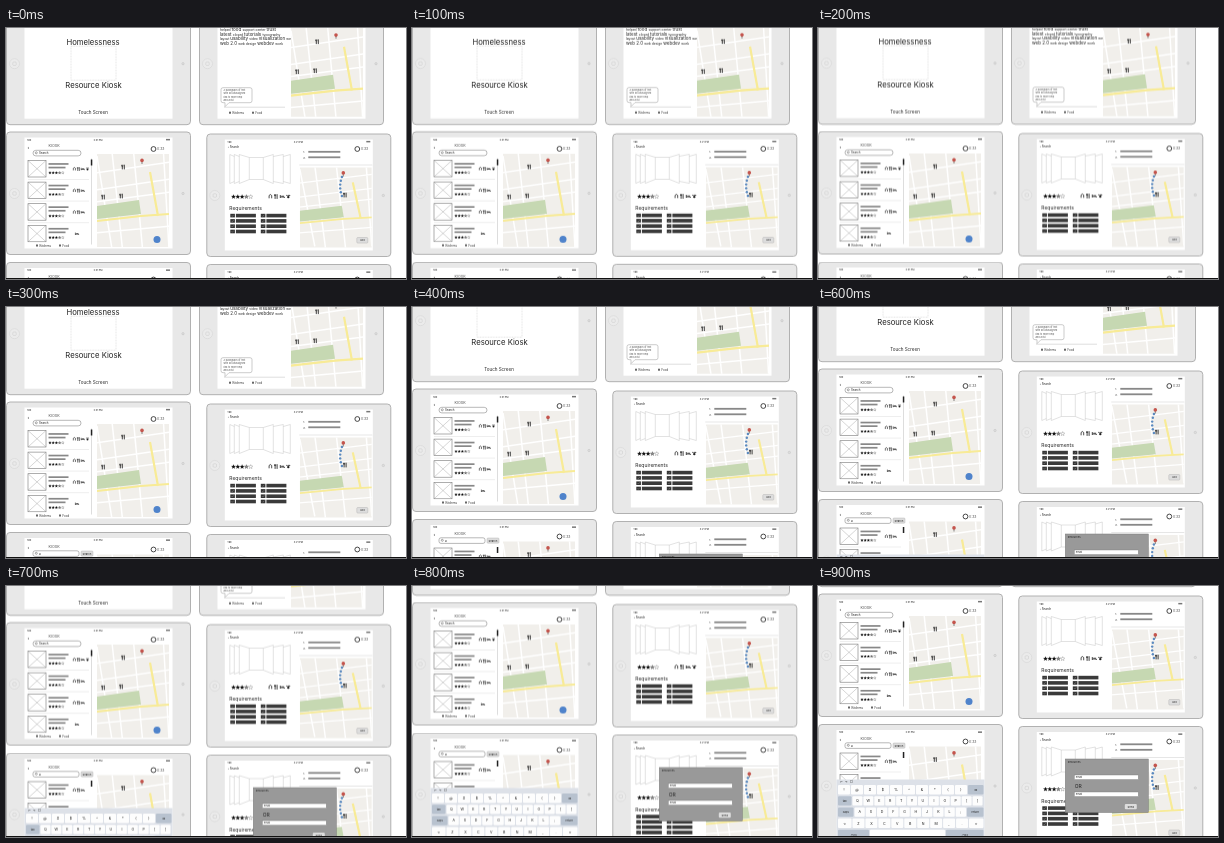
Recreate the animation shown at these times as an HTML page. Size 400 by 251 pixels, loop 1 s.

```html
<!DOCTYPE html>
<html lang="en">
<head>
<meta charset="utf-8">
<title>Kiosk wireframes</title>
<style>
  html, body { margin: 0; width: 100%; height: 100%; overflow: hidden; background: #fff; }
  #stage { display: block; width: 400px; height: 251px; }
  text { font-family: Inter, "Open Sans", sans-serif; fill: #222; }
</style>
</head>
<body>
<svg id="stage" viewBox="0 0 400 251">
  <g id="board"></g>
  <rect y="250" width="400" height="1" fill="#111"/>
</svg>
<script>
const range = (n, fn) => Array.from({ length: n }, (_, i) => fn(i)).join('');
const rect = (x, y, w, h, fill = 'none', more = '') =>
  `<rect x="${x}" y="${y}" width="${w}" height="${h}" fill="${fill}" ${more}/>`;
const path = (d, stroke, w = 0.5, fill = 'none') =>
  `<path d="${d}" stroke="${stroke}" stroke-width="${w}" fill="${fill}"/>`;
const circle = (x, y, r, fill, more = '') =>
  `<circle cx="${x}" cy="${y}" r="${r}" fill="${fill}" ${more}/>`;
const text = (x, y, size, str, more = '') =>
  `<text x="${x}" y="${y}" font-size="${size}" ${more}>${str}</text>`;
const group = (x, y, body, scale = 1) =>
  `<g transform="translate(${x} ${y}) scale(${scale})">${body}</g>`;
const line = (color, w = 0.5) => `stroke="${color}" stroke-width="${w}"`;
const mid = 'text-anchor="middle"';

// Icons, centred on x, y
const fork = (x, y, k) => group(x, y,
  path('M-1.2-2.2V-.6M-.2-2.2V-.6M-.7-1V2.4M1.3-2.3V2.4', '#111', 0.8), k);
const bed = (x, y, k) => group(x, y, path('M-2-1.5V1.5M-2 .5H2V1.5M-1-.3H1.8', '#222', 0.8), k);
const cup = (x, y, k) => group(x, y, path('M-1.2 1.8V-1L0-2 1.4-1V1.8', '#222', 0.8), k);
const paw = (x, y, k) => group(x, y, circle(0, 0.6, 1.2, '#222') +
  range(3, i => circle(-1.4 + i * 1.4, -1.2, 0.6, '#222')), k);
const star = (x, y, r, fill = '#111') => {
  const pts = Array.from({ length: 10 }, (_, i) => {
    const a = i * Math.PI / 5, k = i % 2 ? r * 0.45 : r;
    return (x + k * Math.sin(a)).toFixed(2) + ',' + (y - k * Math.cos(a)).toFixed(2);
  });
  return `<polygon points="${pts.join(' ')}" fill="${fill}" ${line('#111', 0.2)}/>`;
};
const stars = (x, y, r, step) => range(5, i => star(x + i * step, y, r, ['#111', '#888', '#fff'][Math.max(0, i - 2)]));
const clock = (x, y) =>
  circle(x, y, 2.4, '#fff', line('#333', 0.9)) + text(x + 3.6, y + 1.3, 3.4, '0:33', 'opacity=".8"');
const pin = (x, y) => path(`M${x} ${y + 3}V${y}`, '#555', 0.7) + circle(x, y - 0.6, 1.8, '#c4544c');

function map(x, y, w, h, top = 0, viewH = h, forks = true) {
  const streets = 'M-2 19L74 8M-2 36L74 25M-2 48L74 38M-2 79L74 72M12-30L26 100M34-30L46 100' +
    'M0 2L15 95M66-10L72 95';
  return `<svg x="${x}" y="${y}" width="${w}" height="${h}" viewBox="0 ${top} 72 ${viewH}" preserveAspectRatio="none">` +
    rect(0, -30, 72, 150, '#f1efeb') +
    path(streets, '#fff', 1.5) +
    path('M0 52L42 46 44 60 0 65Z', 'none', 0, '#c6d8b2') +
    path('M53 18L61 62M0 67L44 62 72 60', '#f8eb96', 2.2) +
    (forks ? fork(26, 13) + fork(6, 43) + fork(24, 42) + pin(45, 7) : '') + '</svg>';
}

// Tablet body with a 148 x 111 screen starting at 18.5, 6
const tablet = (x, y, body) => group(x, y,
  rect(0.5, 0.5, 184, 122.5, '#e8e8e8', 'rx="3.5" ' + line('#aaa', 0.9)) +
  circle(8.5, 62, 5, '#ebebeb', line('#d8d8d8', 0.7)) +
  rect(6.8, 60.3, 3.4, 3.4, 'none', 'rx=".8" ' + line('#c8c8c8')) +
  circle(177, 62, 1.2, '#ddd', line('#bbb', 0.4)) +
  rect(18.5, 6, 148, 111, '#fff') +
  text(21, 9.2, 2.4, 'Tab') + text(92, 9.2, 2.4, '4:21 PM', mid) +
  rect(160, 7.4, 4, 1.5, '#777') + body);

const tabs = y => rect(30, y - 2, 2, 2, '#666') + text(33.5, y, 2.8, 'Kitchens') +
  rect(53, y - 2, 2, 2, '#666') + text(56.5, y, 2.8, 'Food');

const welcome =
  rect(65, 44.5, 45, 34, '#fff', line('#ccc') + ' stroke-dasharray="1 .6"') +
  text(87, 43, 7.7, 'Homelessness', mid) +
  text(87.5, 86, 7.7, 'Resource Kiosk', mid) +
  text(87, 112, 4.55, 'Touch Screen', mid);

const cloud = [
  ['helped', 'food', 'support center', 'trust'],
  ['latest', 'closed', 'tutorials', 'typography'],
  ['layout', 'usability', 'video', 'visualization', 'web'],
  ['web 2.0', 'web design', 'webdev', 'work']
];
const topics =
  cloud.map((row, r) => `<text x="21" y="${29 + r * 4.9}">` +
    row.map((w, i) => `<tspan font-size="${(i + r) % 2 ? 4.5 : 3.3}">${w} </tspan>`).join('') + '</text>').join('') +
  path('M26 86H51Q53 86 53 88V99Q53 101 51 101H30L26 105V101H24Q22 101 22 99V88Q22 86 24 86Z', '#aaa', 0.6, '#fff') +
  ['A paragraph of text', 'with an unassigned', 'link to more help', 'and a list.'].map((t, i) =>
    text(24.5, 89.6 + i * 3.2, 2.4, t, 'opacity=".8"')).join('') +
  path('M25 105.5H86', '#bbb', 0.5) + tabs(112) +
  map(92, 17, 72, 98, -10);

const header = text(21.5, 17, 4.5, '‹') + text(42.5, 15.9, 3.7, 'KIOSK', 'opacity=".8"') + clock(147.5, 17.5);

function item(i, y) {
  const end = y + 16.5, iconY = y + 8.5;
  return rect(22, y, 18, end - y, '#fff', line('#777', 0.6)) +
    path(`M22 ${y}L40 ${end}M40 ${y}L22 ${end}`, '#999', 0.4) +
    rect(42.5, y + 2.6, 20, 1.7, '#888') + rect(42.5, y + 6.2, 17, 1.7, '#888') +
    stars(44, y + 12.3, 1.4, 3.2) +
    (i < 3 ? cup(68.3, iconY, 0.8) + fork(72.3, iconY, 0.8) : '') +
    (i === 3 ? bed(71, iconY, 0.8) : bed(76.8, iconY, 0.8)) +
    (i === 0 ? paw(81.5, iconY, 0.8) : '') +
    path(`M22 ${y + 19}H83`, '#ddd', 0.5);
}

const listing = header +
  rect(27, 18.8, 48, 5.6, '#fff', 'rx="2.8" ' + line('#888', 0.6)) +
  circle(30.3, 21.3, 1, 'none', line('#555')) + text(33, 22.7, 2.8, 'Search') +
  range(4, i => item(i, 29 + i * 21.6)) +
  path('M85.5 27V113', '#ddd', 1) + rect(84.8, 28, 1.5, 6, '#222') +
  rect(20, 111, 64, 5.5, '#fff') + tabs(115) +
  map(91, 22.5, 72, 93) + circle(151, 108, 3.5, '#4f83cb');

const keyRows = ['!@#$%^&*()', 'QWERTYUIOP[]', 'ASDFGHJKL;', 'ZXCVBNM,.', ' '];
const sideKeys = [['', '⌫'], ['tab', ''], ['caps', 'return'], ['⇧', '⇧'], ['.?123', '.?123']];
function keyRow(str, r) {
  const left = [20, 34.5, 36.5, 34.5, 52][r];
  const right = [150, 165.5, 149, 151, 128][r];
  const y = 61 + r * 11.2, pitch = (right - left) / str.length;
  const key = (x, w, label, fill, size) => rect(x, y, w, 9.4, fill, 'rx="1"') +
    text(x + w / 2, y + 6, size, label.replace('&', '&amp;'), mid);
  const side = (x, w, label) => label ? key(x, w, label, r === 3 ? '#fdfdfd' : '#b8c2cf', 2.7) : '';
  return side(20, left - 21, sideKeys[r][0]) +
    [...str].map((k, i) => key(left + i * pitch, pitch - 1, k, '#fdfdfd', 3.6)).join('') +
    side(right, 165.5 - right, sideKeys[r][1]);
}
const typing = header +
  rect(27, 18.8, 46, 5.6, '#fff', 'rx="2" ' + line('#888', 0.6)) +
  circle(30.3, 21.3, 1, 'none', line('#555')) + text(33, 22.7, 3, 'a') +
  rect(75, 19, 12, 5.2, '#ddd', 'rx="1" ' + line('#aaa', 0.4)) + text(81, 22.6, 2.7, 'Search', mid) +
  item(1, 29) + item(2, 50.6) + rect(84.8, 28, 1.5, 6, '#222') +
  map(91, 22.5, 72, 93) +
  rect(18.5, 55.5, 148, 61.5, '#dde1e8') +
  ['↶', '↷', '▢'].map((s, i) => text(22 + i * 5, 59.4, 3, s)).join('') +
  keyRows.map(keyRow).join('');

const panels = 'M43 24H57V46H43ZM43 24L33 21V50L43 46M33 23L28 21V50L33 48M28 23L23.5 21V50L28 48' +
  'M57 24L67 21V50L57 46M67 23L77 21V50L67 48M77 23L84 21V50L77 48';
const detail =
  text(21.5, 14.6, 2.9, '‹ Search') +
  path(panels, '#c4c4c4', 0.5) +
  stars(27.2, 63.3, 2.2, 4.3) +
  cup(64, 63) + fork(69.5, 63) + bed(76, 63) + paw(82, 63) +
  text(23, 76.8, 5, 'Requirements') +
  range(8, i => {
    const x = 24 + (i % 2) * 30.5, y = 80.3 + (i >> 1) * 5.3;
    return rect(x, y, 4.6, 3.6, '#333') + path(`M${x + 1.2} ${y + 1.8}L${x + 2} ${y + 2.6} ${x + 3.4} ${y + 1}`, '#aaa', 0.4) +
      rect(x + 5.6, y, 20, 3.6, '#3a3a3a');
  }) +
  range(2, i => text(97, 19.6 + i * 5.5, 2.6, i + 1 + '.') + rect(102, 17.4 + i * 5.5, 32, 1.8, '#888')) +
  clock(151, 15.5) +
  path('M93 31.5H166', '#ccc', 0.5) +
  map(93.5, 34, 72, 80, 0, 96.4, false) +
  range(6, i => circle(135.6 - Math.sin(i / 5 * Math.PI) * 1.8, 43.5 + i * 3.8, 1.2, '#5b8ac0')) +
  pin(137, 40) + fork(138.5, 61.5) +
  rect(150.5, 104, 11, 5.6, '#ddd', 'rx="1" ' + line('#aaa', 0.4)) + text(156, 107.8, 2.5, 'Add', mid);

const field = y => rect(56, y, 64, 4.6, '#fff', line('#777', 0.4)) + text(57.5, y + 3.3, 2.5, 'Email');
const dialog = detail +
  rect(47, 33, 83, 53.5, '#999', line('#777', 0.5)) +
  text(49.5, 37.2, 2.6, 'Resources') + field(49) +
  text(56.5, 61.6, 5, 'OR') + field(66) +
  rect(106.5, 78, 12, 5.2, '#ddd', 'rx="1"') + text(112.5, 81.6, 2.7, 'Send', mid);

const board = document.getElementById('board');
board.innerHTML =
  tablet(0, -26.3, welcome) + tablet(193, -26.3, topics) +
  tablet(0, 103.5, listing) + tablet(200.3, 105.5, detail) +
  tablet(0, 234, typing) + tablet(200.3, 236, dialog);

// Scroll position held for each 100 ms
const scroll = [0, 0.2, 0.5, 9, 22, 31, 42, 67.4, 87.5, 96];
const steps = scroll.map((y, i) => ({
  offset: i / scroll.length, transform: `translateY(${-y}px)`, easing: 'steps(1, end)'
}));
steps.push({ offset: 1, transform: 'translateY(-96px)' });
board.animate(steps, { duration: 1000, iterations: Infinity });
</script>
</body>
</html>
```
